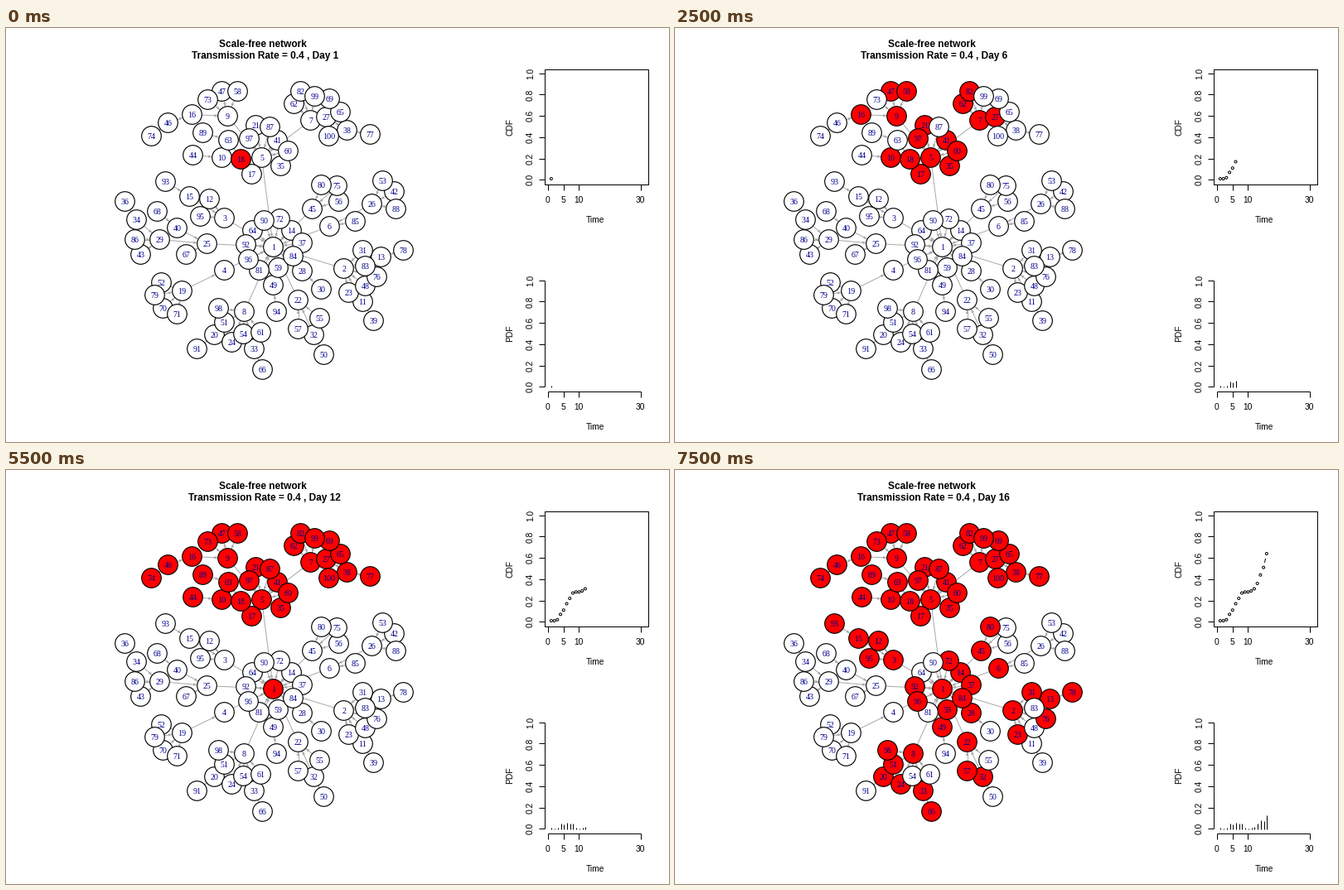
These frames come from a looping animation (800x500 px, 8000 ms). A matplotlib script:

```python
import math
import matplotlib.pyplot as plt
from matplotlib.animation import FuncAnimation
from matplotlib.patches import Circle, Polygon

W, H, DPI = 800, 500, 100
PX = 72 / DPI  # points per pixel
R = 12
DAYS = 16
GRAY = "#a9a9a9"

fig = plt.figure(figsize=(W / DPI, H / DPI), dpi=DPI, facecolor="white")
ax = fig.add_axes([0, 0, 1, 1])
ax.set(xlim=(0, W), ylim=(H, 0))
ax.axis("off")

# ---- network: a tree, given as children of each hub ----
pos = {1: (322, 264)}
parent = {}


def link(hub, kids):
    for k, p in kids.items():
        pos[k] = p
        parent[k] = hub


link(1, {2: (407, 290), 3: (263, 229), 4: (263, 292), 5: (308, 156),
         6: (390, 239), 8: (287, 342), 14: (344, 244), 22: (352, 328),
         25: (242, 260), 28: (357, 293), 37: (357, 259), 45: (369, 218),
         49: (322, 310), 59: (328, 289), 64: (297, 244), 72: (330, 230),
         81: (305, 292), 84: (346, 275), 90: (311, 232), 92: (289, 261),
         96: (292, 279)})
link(2, {11: (430, 330), 13: (452, 276), 23: (413, 319), 31: (430, 268),
         48: (433, 311), 76: (447, 300), 83: (433, 287)})
link(3, {12: (245, 206), 15: (221, 203), 95: (234, 227)})
link(4, {19: (212, 317)})
link(5, {7: (367, 111), 9: (267, 106), 17: (296, 176), 18: (283, 158),
         21: (301, 117), 35: (331, 166), 41: (327, 135), 60: (340, 148),
         87: (318, 119), 97: (293, 133)})
link(6, {26: (441, 212), 85: (421, 233)})
link(7, {27: (386, 107), 62: (347, 91), 82: (355, 76), 99: (372, 82)})
link(8, {24: (272, 379), 33: (299, 387), 51: (263, 355), 54: (286, 369),
         61: (307, 367), 98: (256, 338)})
link(9, {16: (224, 104), 47: (260, 76), 58: (279, 76), 73: (243, 86)})
link(10, {44: (225, 153)})
link(11, {39: (443, 353)})
link(13, {78: (479, 268)})
link(15, {93: (192, 185)})
link(16, {46: (195, 114)})
link(18, {10: (260, 156), 63: (268, 135)})
link(19, {52: (187, 307), 70: (189, 338), 71: (206, 345), 79: (179, 322)})
link(20, {91: (230, 387)})
link(22, {32: (371, 370), 55: (378, 350), 57: (352, 363)})
link(25, {29: (185, 255), 40: (206, 241), 67: (217, 273)})
link(26, {42: (468, 197), 53: (454, 184), 88: (470, 218)})
link(27, {38: (411, 123), 65: (403, 101), 69: (390, 85), 100: (389, 130)})
link(28, {30: (380, 315)})
link(29, {34: (157, 231), 43: (162, 273), 86: (155, 255)})
link(32, {50: (383, 394)})
link(33, {66: (309, 412)})
link(34, {36: (143, 209)})
link(38, {77: (439, 128)})
link(40, {68: (182, 221)})
link(45, {56: (401, 209), 75: (399, 190), 80: (380, 189)})
link(46, {74: (175, 130)})
link(49, {94: (326, 342)})
link(51, {20: (251, 370)})
link(63, {89: (237, 126)})

# newly infected nodes per day
NEW = {1: [18], 3: [5], 4: [9, 7, 21, 41, 60], 5: [10, 97, 35, 82],
       6: [16, 47, 58, 62, 27, 17], 7: [73, 63, 38, 65, 87],
       8: [44, 89, 77, 69, 100], 9: [99], 11: [46], 12: [74, 1],
       13: [3, 92, 84, 6, 8], 14: [15, 12, 72, 96, 28, 49, 2, 22],
       15: [98, 51, 33, 45, 13, 37, 57],
       16: [93, 95, 14, 59, 80, 31, 78, 76, 23, 20, 24, 66, 32]}
sick_day = {n: d for d, nodes in NEW.items() for n in nodes}


def text(x, y, s, size=10.2, rot=0, font="Liberation Sans", **kw):
    return ax.text(x, y, s, fontsize=size * PX, family=font, rotation=rot,
                   rotation_mode="anchor", ha="center", va="baseline", **kw)


def line(xs, ys, color="black", **kw):
    return ax.plot(xs, ys, color=color, lw=PX, solid_capstyle="butt", **kw)[0]


def edge(a, b):
    (x0, y0), (x1, y1) = pos[a], pos[b]
    d = math.hypot(x1 - x0, y1 - y0)
    ux, uy = (x1 - x0) / d, (y1 - y0) / d
    tx, ty = x1 - ux * R + 0.5, y1 - uy * R + 0.5
    line([x0 + 0.5, tx], [y0 + 0.5, ty], GRAY, zorder=1)
    bx, by = tx - 4.5 * ux, ty - 4.5 * uy
    ax.add_patch(Polygon([(tx, ty), (bx - 1.7 * uy, by + 1.7 * ux),
                          (bx + 1.7 * uy, by - 1.7 * ux)],
                         fc=GRAY, ec="none", zorder=1))


for kid, hub in parent.items():
    edge(kid, hub)

disks = {}
for n in sorted(pos):
    x, y = pos[n]
    disks[n] = ax.add_patch(Circle((x + 0.5, y + 0.5), R - 0.2, fc="white",
                                   ec="black", lw=1.15 * PX, zorder=2))
    text(x + 0.5, y + 4, str(n), 10, font="Liberation Serif",
         color="#00008b", zorder=3)

text(310.3, 23, "Scale-free network", 11.85, weight="bold")
title = text(312.3, 37, "", 11.85, weight="bold")

# ---- side plots ----
LEFT, RIGHT, TOP, BOTTOM = 649.5, 774.5, 49.5, 188.5
PDF_DY = 250


def px(t):
    return LEFT + (RIGHT - LEFT) * (t / 31 + 0.04) / 1.08


def py(v, dy=0):
    return dy + BOTTOM - (BOTTOM - TOP) * (v + 0.04) / 1.08


def axes(name, dy):
    base = BOTTOM + dy
    line([px(0), px(30)], [base, base])
    line([LEFT, LEFT], [py(0, dy), py(1, dy)])
    for t in (0, 5, 10, 30):
        line([px(t), px(t)], [base, base + 7])
        text(px(t) - 0.5, base + 22.5, str(t))
    for i in range(6):
        y = py(i / 5, dy)
        line([LEFT, LEFT - 7], [y, y])
        text(636, y, f"{i / 5:.1f}", rot=90)
    text(710.5, base + 46.5, "Time")
    text(611, (TOP + BOTTOM) / 2 + dy, name, rot=90)


axes("CDF", 0)
axes("PDF", PDF_DY)
line([LEFT, RIGHT, RIGHT, LEFT, LEFT], [TOP, TOP, BOTTOM, BOTTOM, TOP])

GAP = 6  # space kept clear around each point
marks = []  # (day, artist)
total = 0
last = None
for day in range(1, DAYS + 1):
    count = len(NEW.get(day, []))
    total += count
    x, y = px(day), py(total / 100)
    marks.append((day, ax.add_patch(Circle((x, y), 1.5, fc="none", ec="black",
                                           lw=PX, zorder=4))))
    if last:
        dx, dy = x - last[0], y - last[1]
        f = GAP / math.hypot(dx, dy)
        if f < 0.5:
            marks.append((day, line([last[0] + f * dx, x - f * dx],
                                    [last[1] + f * dy, y - f * dy])))
    last = x, y
    bx = math.floor(x) + 0.5
    top = min(round(py(count / 100, PDF_DY)), 433)
    marks.append((day, line([bx, bx], [434, top])))


def show(i):
    day = i + 1
    title.set_text(f"Transmission Rate = 0.4 , Day {day}")
    for n, disk in disks.items():
        disk.set_facecolor("red" if sick_day.get(n, DAYS + 1) <= day else "white")
    for d, mark in marks:
        mark.set_visible(d <= day)
    return []


anim = FuncAnimation(fig, show, frames=DAYS, interval=500, repeat=True,
                     repeat_delay=0, blit=False)
plt.show()
```
